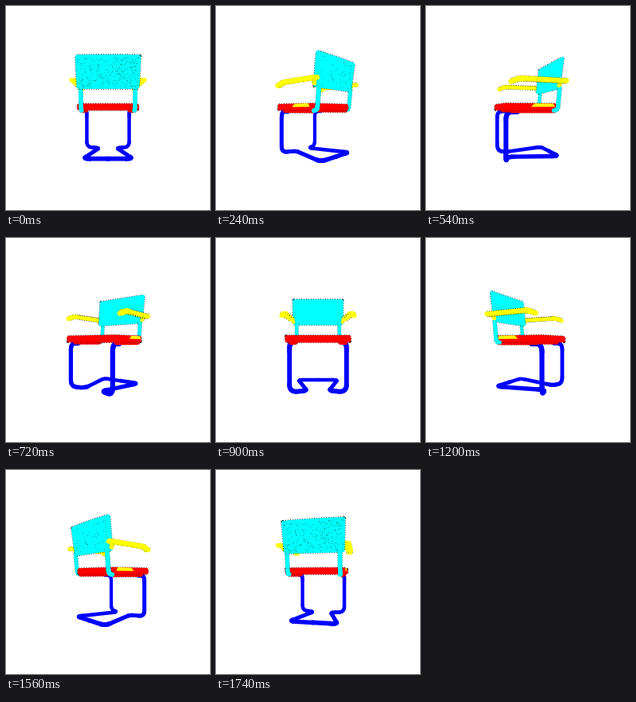
These frames come from a looping animation (256 px wide and 256 px high, 1800 ms). An HTML page with a canvas:

```html
<!DOCTYPE html>
<html lang="en">
<head>
<meta charset="utf-8">
<title>Turning chair</title>
<style>
html, body { margin: 0; width: 100%; height: 100%; overflow: hidden; background: #fff; }
canvas { display: block; width: 100vw; height: 100vh; }
</style>
</head>
<body>
<canvas id="stage" width="256" height="256"></canvas>
<script>
const ctx = document.getElementById('stage').getContext('2d');
const STEPS = 30, STEP_MS = 60;
const DIST = 230, CX = 128, HORIZON = 130;
const CYAN = '#00ffff', YELLOW = '#ffff00', RED = '#ff0000', BLUE = '#0000ff';
let sin = 0, cos = 1;

// Chair space: x across, y up, z towards the backrest.
function project([x, y, z]) {
  const depth = z * cos - x * sin;
  const s = DIST / (DIST - depth);
  return { x: CX + (x * cos + z * sin) * s, y: HORIZON - y * s, s, depth };
}

const mix = (a, b, t) => a.map((v, i) => v + (b[i] - v) * t);
const dist = (a, b) => Math.hypot(...a.map((v, i) => v - b[i]));
const mirror = pts => pts.map(([x, y, z]) => [-x, y, z]);

// Polyline in space with its corners rounded off.
function rounded(pts, radius) {
  const out = [pts[0]];
  for (let i = 1; i < pts.length - 1; i++) {
    const p = pts[i], prev = pts[i - 1], next = pts[i + 1];
    const a = mix(p, prev, Math.min(0.5, radius / dist(p, prev)));
    const b = mix(p, next, Math.min(0.5, radius / dist(p, next)));
    for (let k = 0; k <= 6; k++) {
      const t = k / 6;
      out.push(mix(mix(a, p, t), mix(p, b, t), t));
    }
  }
  out.push(pts[pts.length - 1]);
  return out;
}

function hull(pts) {
  const sorted = [...pts].sort((a, b) => a.x - b.x || a.y - b.y);
  const half = list => {
    const h = [];
    for (const p of list) {
      while (h.length > 1) {
        const a = h[h.length - 2], b = h[h.length - 1];
        if ((b.x - a.x) * (p.y - a.y) - (b.y - a.y) * (p.x - a.x) > 0) break;
        h.pop();
      }
      h.push(p);
    }
    h.pop();
    return h;
  };
  return half(sorted).concat(half(sorted.reverse()));
}

function trace(pts) {
  ctx.beginPath();
  pts.forEach(p => ctx.lineTo(p.x, p.y));
}

// Dotted dark edge around the current path.
function rim(width) {
  ctx.lineCap = 'butt';
  ctx.setLineDash([1, 2]);
  ctx.strokeStyle = '#000';
  ctx.lineWidth = width;
  ctx.stroke();
  ctx.setLineDash([]);
}

function tube(pts, width, color, edge = 0.8) {
  const p = pts.map(project);
  if (edge) {
    trace(p);
    rim(width * p[p.length >> 1].s + edge);
  }
  ctx.lineCap = 'round';
  ctx.strokeStyle = color;
  for (let i = 1; i < p.length; i++) {
    ctx.lineWidth = width * (p[i - 1].s + p[i].s) / 2;
    trace([p[i - 1], p[i]]);
    ctx.stroke();
  }
}

function solid(pts, border, color) {
  const p = pts.map(project);
  const width = border * p.reduce((sum, q) => sum + q.s, 0) / p.length;
  trace(hull(p));
  ctx.closePath();
  rim(width + 1.4);
  ctx.strokeStyle = ctx.fillStyle = color;
  ctx.lineWidth = width;
  ctx.stroke();
  ctx.fill();
}

// Frame
const halfBase = rounded([
  [30.5, -2.5, -22], [30.5, -2.5, -34], [30.5, -54, -34],
  [12, -54, -29], [27.5, -54, 28.5], [0, -54, 28.5]
], 8);
const base = halfBase.concat(mirror(halfBase).reverse());
const rail = [[30.5, -1.2, -27], [30.5, -1.2, 21]];
const post = rounded([[30, 25, 28.5], [30, 0, 26], [30, -1, 21]], 4);
const arms = [36.5, 39.5].map(x =>
  rounded([[x, 32, 32], [x, 32, -22], [x, 28.5, -30]], 5));
const bracket = [[36, 31, 27], [34, 27, 25.5]];

// Seat and back
const seat = [];
for (const x of [-33.5, 33.5])
  for (const y of [0.8, 5.2])
    for (const z of [-35, 21]) seat.push([x, y, z]);

const backPoint = (u, v) =>
  [u * (33 + v), 25 + v * 33, 25.5 + v * 4.5 + 1.2 * (1 - u * u)];
const back = [];
for (const u of [-1, -0.5, 0, 0.5, 1]) back.push(backPoint(u, 0), backPoint(u, 1));

let seed = 7;
const random = () => (seed = (seed * 16807) % 2147483647) / 2147483647;
const specks = Array.from({ length: 260 }, () => backPoint(random() * 2 - 1, random()));

function drawBack() {
  solid(back, 3.8, CYAN);
  if (cos <= 0) return;
  // the weave shows most when seen square on
  ctx.fillStyle = 'rgba(0,90,90,.55)';
  specks.slice(0, specks.length * cos ** 4).map(project)
    .forEach(p => ctx.fillRect(Math.round(p.x), Math.round(p.y), 1, 1));
}

function drawSeat() {
  tube(rail, 5, RED);
  tube(mirror(rail), 5, RED);
  solid(seat, 3.6, RED);
  for (const side of [-1, 1]) {
    if (-side * DIST * sin < 35.5) continue;
    const x = 35.3 * side;
    trace([[x, 6.6, 18], [x, 6.6, -4], [x, 3, -8], [x, 3, 20]].map(project));
    ctx.fillStyle = YELLOW;
    ctx.fill();
  }
}

function drawArm(flip) {
  tube(flip(bracket), 4.5, YELLOW);
  arms.forEach(a => tube(flip(a), 5.2, YELLOW));
}

const same = pts => pts;
const parts = [
  { at: [0, 3, -7], draw: drawSeat },
  { at: [0, 42, 28], draw: drawBack }
];
for (const flip of [same, mirror]) {
  parts.push({ at: flip([[30, 12, 26]])[0], draw: () => tube(flip(post), 4.7, CYAN) });
  parts.push({ at: flip([[38, 31, 1]])[0], draw: () => drawArm(flip) });
}

function render(now) {
  const step = Math.floor(now / STEP_MS) % STEPS;
  const angle = step / STEPS * Math.PI * 2;
  sin = Math.sin(angle);
  cos = Math.cos(angle);
  ctx.fillStyle = '#fff';
  ctx.fillRect(0, 0, 256, 256);
  ctx.lineJoin = 'round';
  tube(base, 5, BLUE, 0);
  parts
    .map(p => ({ draw: p.draw, depth: project(p.at).depth }))
    .sort((a, b) => a.depth - b.depth)
    .forEach(p => p.draw());
}

const start = performance.now();
function tick() {
  render(performance.now() - start);
  requestAnimationFrame(tick);
}
tick();
</script>
</body>
</html>
```
